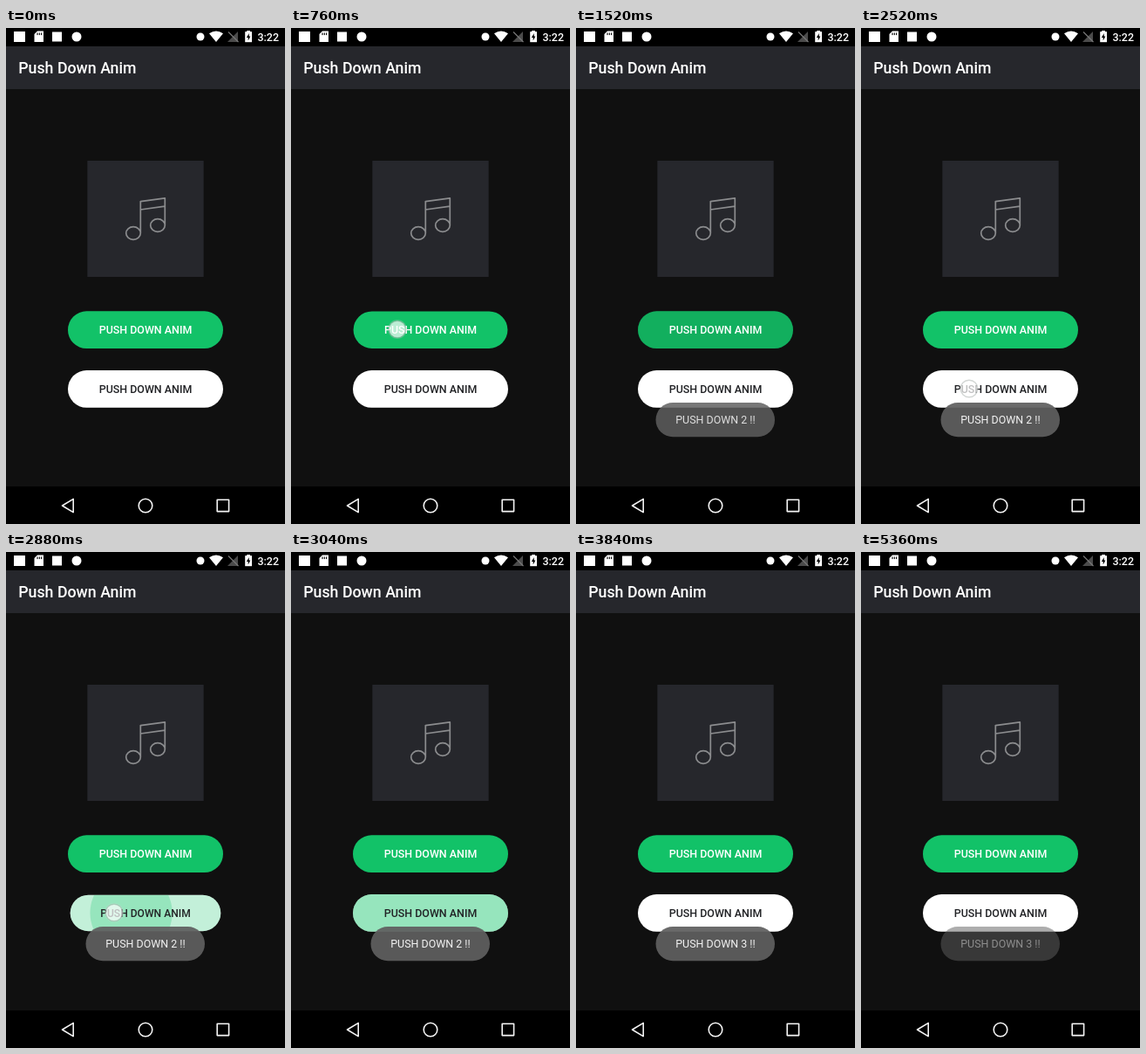
Animation of 320 by 568 pixels, one loop 5.4 s. Source, as an HTML page with a canvas:

```html
<!DOCTYPE html>
<html lang="en">
<head>
<meta charset="utf-8">
<title>Push Down Anim</title>
<style>
  html, body { margin: 0; width: 100%; height: 100%; overflow: hidden; background: #000; }
  canvas { display: block; width: 320px; height: 568px; }
</style>
</head>
<body>
<canvas id="stage"></canvas>
<script>
const W = 320, H = 568, LOOP = 5400, STEP = 40;
const FONT = 'Roboto, "Noto Sans", sans-serif';
const PANEL = '#26272c';
const dpr = window.devicePixelRatio || 1;

function setup(canvas, w, h) {
  canvas.width = Math.round(w * dpr);
  canvas.height = Math.round(h * dpr);
  const c = canvas.getContext('2d');
  c.scale(dpr, dpr);
  return c;
}

const ctx = setup(document.getElementById('stage'), W, H);

const clamp = v => Math.max(0, Math.min(1, v));
const span = (t, start, length) => clamp((t - start) / length);
const smooth = p => (1 - Math.cos(Math.PI * p)) / 2;
const easeOut = p => 1 - (1 - p) * (1 - p);
const easeIn = p => p * p;

function pill(c, x, y, w, h, color) {
  c.beginPath();
  c.roundRect(x, y, w, h, h / 2);
  c.fillStyle = color;
  c.fill();
}

function disc(x, y, r, color) {
  ctx.beginPath();
  ctx.arc(x, y, r, 0, Math.PI * 2);
  ctx.fillStyle = color;
  ctx.fill();
}

function rect(x, y, w, h, color) {
  ctx.fillStyle = color;
  ctx.fillRect(x, y, w, h);
}

function poly(points, color) {
  ctx.beginPath();
  points.forEach(([x, y]) => ctx.lineTo(x, y));
  ctx.closePath();
  ctx.fillStyle = color;
  ctx.fill();
}

function text(c, str, x, y, font, color, align = 'left') {
  c.font = font + ' ' + FONT;
  c.textAlign = align;
  c.fillStyle = color;
  c.fillText(str, x, y);
}

function statusBar() {
  rect(0, 0, W, 21, '#000');
  const white = '#fff';
  rect(9, 4, 13, 12, white);
  poly([[36, 3.5], [43, 3.5], [43, 16], [32.5, 16], [32.5, 7]], white);
  for (const x of [35.5, 37.8, 40.1]) rect(x, 5.5, 1.1, 2.6, '#000');
  rect(53, 4.5, 11, 11, white);
  disc(81, 10, 5.5, white);
  disc(223, 10, 4.5, white);

  ctx.beginPath();
  ctx.moveTo(241, 16);
  ctx.lineTo(233, 6.2);
  ctx.quadraticCurveTo(241, .6, 249, 6.2);
  ctx.closePath();
  ctx.fillStyle = white;
  ctx.fill();

  poly([[266, 4], [266, 16], [254, 16]], '#4b4b4b');
  ctx.lineWidth = 1.2;
  ctx.strokeStyle = '#777';
  ctx.beginPath();
  ctx.moveTo(255, 4.5);
  ctx.lineTo(266.5, 16);
  ctx.stroke();

  rect(276.2, 3, 3.8, 2, white);
  rect(274.2, 4.2, 7.8, 12, white);
  poly([[278.7, 6], [275.9, 11], [277.7, 11], [277.7, 14.4], [280.4, 9.4], [278.7, 9.4]], '#000');
  text(ctx, '3:22', 313, 14.6, '500 12.44px', white, 'right');
}

function note() {
  rect(93.3, 152, 133.4, 133, PANEL);
  ctx.strokeStyle = '#8b8c8e';
  ctx.lineWidth = 1.7;
  ctx.beginPath();
  ctx.ellipse(146, 235, 8.3, 7.3, 0, 0, Math.PI * 2);
  ctx.moveTo(182.3, 226);
  ctx.ellipse(174, 226, 8.3, 7.3, 0, 0, Math.PI * 2);
  ctx.moveTo(154.3, 235);
  ctx.lineTo(154.3, 198.6);
  ctx.lineTo(182.3, 194.8);
  ctx.lineTo(182.3, 226);
  ctx.moveTo(154.3, 208);
  ctx.lineTo(182.3, 204.2);
  ctx.stroke();
}

function navBar() {
  rect(0, 525, W, 43, '#000');
  ctx.strokeStyle = '#f4f4f4';
  ctx.lineWidth = 1.6;
  ctx.lineJoin = 'round';
  ctx.beginPath();
  ctx.moveTo(64.5, 547);
  ctx.lineTo(77.2, 539.4);
  ctx.lineTo(77.2, 554.6);
  ctx.closePath();
  ctx.moveTo(167.8, 547);
  ctx.arc(160, 547, 7.8, 0, Math.PI * 2);
  ctx.rect(242.2, 540.2, 13.4, 13.4);
  ctx.stroke();
}

// All times are milliseconds within the loop.
const buttons = [
  { y: 324.3, color: '#12c268', ink: '#fff', ripple: '25,48,36',
    touch: [122, 345], show: 750, down: 745, up: 1090, wave: 930 },
  { y: 392, color: '#fff', ink: '#222326', ripple: '18,194,104',
    touch: [124, 413], show: 2510, down: 2570, up: 2890, wave: 2705 }
];

const BOX = { x: 71, w: 178, h: 42.8 };
const REACH = Math.hypot(BOX.w, BOX.h) / 2;

function ripple(b, t) {
  const fade = 1 - span(t, b.wave + 340, 340);
  const tint = 0.25 * fade;
  const base = tint * span(t, b.wave - 80, 120);
  if (base <= 0) return;
  ctx.fillStyle = `rgba(${b.ripple},${base})`;
  ctx.fillRect(BOX.x, b.y, BOX.w, BOX.h);
  const p = span(t, b.wave, 330);
  const [x, y] = b.touch;
  const cx = x + (W / 2 - x) * p;
  const cy = y + (b.y + BOX.h / 2 - y) * p;
  disc(cx, cy, REACH * p + 0.01, `rgba(${b.ripple},${tint * span(t, b.wave, 120)})`);
}

function button(b, t) {
  const cy = b.y + BOX.h / 2;
  const push = smooth(span(t, b.down, 50)) - smooth(span(t, b.up, 125));
  const s = 1 - 0.03 * push;
  ctx.save();
  ctx.translate(W / 2, cy);
  ctx.scale(s, s);
  ctx.translate(-W / 2, -cy);
  pill(ctx, BOX.x, b.y, BOX.w, BOX.h, b.color);
  ctx.save();
  ctx.clip();
  ripple(b, t);
  ctx.restore();
  text(ctx, 'PUSH DOWN ANIM', W / 2, cy + 4.7, '500 12.44px', b.ink, 'center');
  ctx.restore();
}

function touchDot(b, t) {
  if (t < b.show || t >= b.up + 20) return;
  const [x, y] = b.touch;
  disc(x, y, 11, 'rgba(255,255,255,.16)');
  disc(x, y, 9.6, 'rgba(255,255,255,.66)');
  ctx.beginPath();
  ctx.arc(x, y, 9.8, 0, Math.PI * 2);
  ctx.strokeStyle = 'rgba(150,160,155,.42)';
  ctx.lineWidth = 1.4;
  ctx.stroke();
}

const TOAST = { x: 91.5, y: 429, w: 136.5, h: 39.3 };

function makeToast(label) {
  const canvas = document.createElement('canvas');
  const c = setup(canvas, W, 50);
  pill(c, TOAST.x, 5, TOAST.w, TOAST.h, 'rgba(95,95,95,.93)');
  c.fontStretch = 'condensed';
  // Narrow face when there is one, otherwise the smaller regular size.
  c.font = '14.2px ' + FONT;
  const size = c.measureText(label).width < 97 ? 14.2 : 12.44;
  text(c, label, W / 2, 25 + size * 0.35, size + 'px', '#f2f2f2', 'center');
  return canvas;
}

const toasts = [
  { image: makeToast('PUSH DOWN 2 !!'), start: 1167, end: 3120 },
  { image: makeToast('PUSH DOWN 3 !!'), start: 3340, end: 5025 }
];

function toast(item, t) {
  const alpha = easeOut(span(t, item.start, 500)) - easeIn(span(t, item.end, 500));
  if (alpha <= 0) return;
  ctx.globalAlpha = alpha;
  ctx.drawImage(item.image, 0, TOAST.y - 5, W, 50);
  ctx.globalAlpha = 1;
}

function draw(t) {
  rect(0, 0, W, H, '#101010');
  statusBar();
  rect(0, 21, W, 49, PANEL);
  text(ctx, 'Push Down Anim', 14.2, 52.3, '500 17.78px', '#fff');
  note();
  buttons.forEach(b => button(b, t));
  toasts.forEach(item => toast(item, t));
  navBar();
  buttons.forEach(b => touchDot(b, t));
}

const origin = performance.now();
function tick() {
  const t = (performance.now() - origin) % LOOP;
  draw(Math.floor(t / STEP) * STEP);
  requestAnimationFrame(tick);
}
tick();
</script>
</body>
</html>
```
